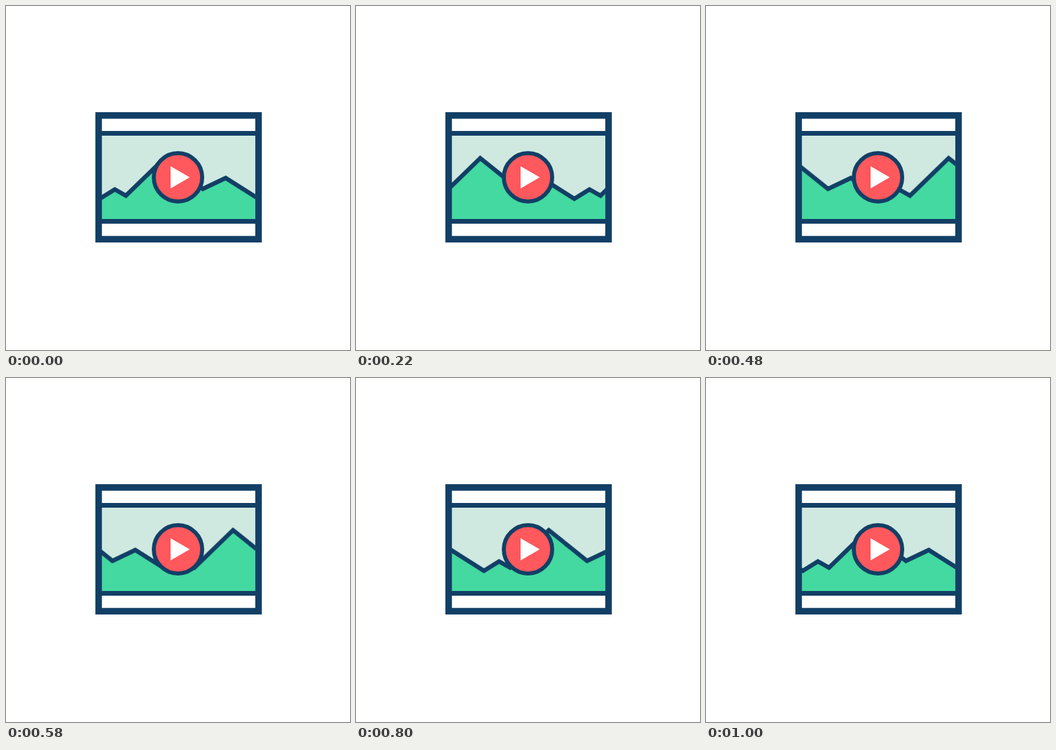
Recreate the animation shown at these times as an HTML page. Size 512 by 512 pixels, loop 1020 ms.

```html
<!DOCTYPE html>
<html lang="en">
<head>
<meta charset="utf-8">
<title>Video player</title>
<style>
  html, body { margin: 0; width: 100%; height: 100%; overflow: hidden; background: #fff; }
  svg { display: block; width: 100vw; height: 100vh; }
  .ink { fill: none; stroke: #123f66; }
  .hills { fill: #43d9a0; stroke-width: 6.5; animation: scroll 1020ms steps(51, end) infinite; }
  /* One period of the ridge is 236.5 units wide. */
  @keyframes scroll {
    from { transform: translateX(235.9px); }
    to { transform: translateX(-0.6px); }
  }
</style>
</head>
<body>
<svg viewBox="0 0 512 512">
  <defs>
    <clipPath id="screen"><rect x="142.5" y="190" width="228.5" height="130"/></clipPath>
  </defs>
  <g clip-path="url(#screen)">
    <rect x="142" y="190" width="230" height="130" fill="#cfe9e0"/>
    <path class="ink hills" d="M-236.5 226.5
      l57 45.7 34-16.2 49 31 22.5-14 16.5 9.3 57.5-55.8
      l57 45.7 34-16.2 49 31 22.5-14 16.5 9.3 57.5-55.8
      l57 45.7 34-16.2 49 31 22.5-14 16.5 9.3 57.5-55.8
      V340H-236.5Z"/>
  </g>
  <path class="ink" stroke-width="7" d="M138 189.5H376M138 320.5H376"/>
  <rect class="ink" stroke-width="9.7" x="137.9" y="162.9" width="238" height="184.2"/>
  <circle cx="256" cy="255" r="36" fill="#ff585d" stroke="#123f66" stroke-width="6"/>
  <path d="M245 238.5L273.5 255 245 271.5Z" fill="#fff"/>
</svg>
</body>
</html>
```
